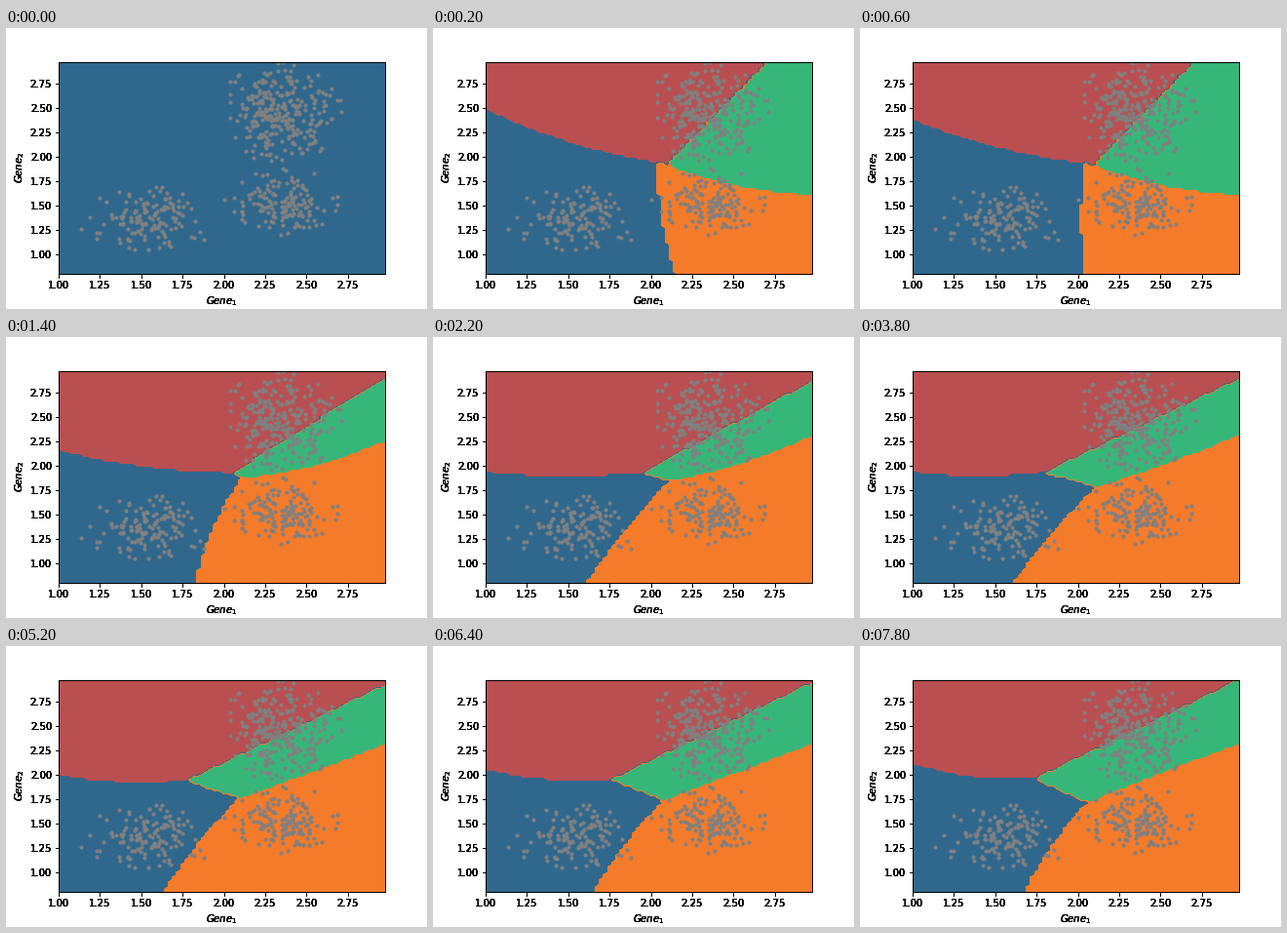
These frames come from a looping animation (432x288 px, 8 s). A matplotlib script:

```python
import numpy as np
import matplotlib.pyplot as plt
from matplotlib.animation import FuncAnimation

FRAMES, STEP = 40, 200
RED, BLUE, ORANGE, GREEN = range(4)
COLORS = ["#b94f51", "#30688d", "#f47b2a", "#36b779"]
X0, X1, Y0, Y1 = 1.0, 2.975, 0.8, 2.975
LEFT, RIGHT, TOP, BOTTOM = 54, 388.8, 34.56, 252
BOX = [0.125, 0.125, 0.775, 0.755]
OVERLAYS = 8  # stacked axes give the text its heavy edges


def span(k, start, end):
    return np.clip((k - start) / (end - start), 0, 1)


def curve(t, a, b, c):
    """Parabola through a, b, c at t = 0, 0.5, 1."""
    return a + t * (4 * b - 3 * a - c) + t * t * (2 * a + 2 * c - 4 * b)


def regions(k):
    """Class of every grid point; all borders are in stage pixels."""
    if k == 0:
        return np.full(px.shape, BLUE)
    fast = min(1, np.exp((3 - k) / 1.6))
    turn = min(1, (k - 3) / 8)
    grow = span(k, 3, 19)
    drift = span(k, 19, 39)

    # Joints: red/blue/green on the left, blue/green/orange on the right
    lx = 241 - 51 * grow**2 * (3 - 2 * grow) - 10 * drift
    ly = 140 - 1 * grow - 3 * drift
    rx = 243 - 9 * drift
    ry = 141 + 12 * grow + 7 * drift

    red_blue = curve((px - LEFT) / (lx - LEFT), 95 + 44 * turn - 18 * drift,
                     124.5 + 18.5 * turn - 8.5 * drift, ly)
    red_end = 47 - 59 * fast - 12 * span(k, 9, 39)
    red_green = ly + (red_end - ly) * (px - lx) / (RIGHT - lx)
    roof = np.where(px < lx, red_blue, red_green)

    blue_green = ly + (ry - ly) * (px - lx) / (rx - lx)
    green_orange = curve((px - rx) / (RIGHT - rx), ry,
                         128.5 + 33.5 * fast, 100 + 70 * fast)
    floor = np.where(px < rx, blue_green, green_orange)

    side = curve(np.clip((py - ry) / (BOTTOM - ry), 0, 1), rx - 12 * fast,
                 227.5 - 31 * turn, 231 - 73 * turn + 11 * drift)

    zone = np.where(px < side, BLUE, ORANGE)
    zone[(px > lx) & (py < floor)] = GREEN
    zone[py < roof] = RED
    return zone


def cluster(n, center, spread, reach=2.4):
    pts = rng.normal(size=(2 * n, 2))
    return center + pts[np.hypot(*pts.T) < reach][:n] * spread


gx, gy = np.meshgrid(np.linspace(X0, X1, 80), np.linspace(Y0, Y1, 88))
px = LEFT + (gx - X0) / (X1 - X0) * (RIGHT - LEFT)
py = BOTTOM - (gy - Y0) / (Y1 - Y0) * (BOTTOM - TOP)

rng = np.random.default_rng(12)
dots = np.vstack([
    cluster(140, (1.53, 1.36), (0.18, 0.16)),
    cluster(150, (2.37, 1.53), (0.16, 0.15)),
    cluster(265, (2.33, 2.46), (0.17, 0.22)),
])

fig = plt.figure(figsize=(6, 4), dpi=72, facecolor="white")
for i in range(OVERLAYS):
    layer = fig.add_axes(BOX, label=str(i), zorder=i)
    layer.patch.set_visible(False)
    layer.set(xlim=(X0, X1), ylim=(Y0, Y1),
              xlabel="$Gene_1$", ylabel="$Gene_2$",
              xticks=np.arange(1, 2.8, 0.25), yticks=np.arange(1, 2.8, 0.25))
ax = fig.axes[0]
ax.scatter(*dots.T, s=10, color="#808080", linewidths=1, zorder=2)
fill = None


def draw(k):
    global fill
    if fill is not None:
        fill.remove()
    fill = ax.contourf(gx, gy, regions(k), levels=np.arange(-0.5, 4),
                       colors=COLORS, zorder=0)
    return [fill]


anim = FuncAnimation(fig, draw, frames=FRAMES, interval=STEP,
                     init_func=lambda: [], repeat=True, repeat_delay=0,
                     blit=False)
plt.show()
```
